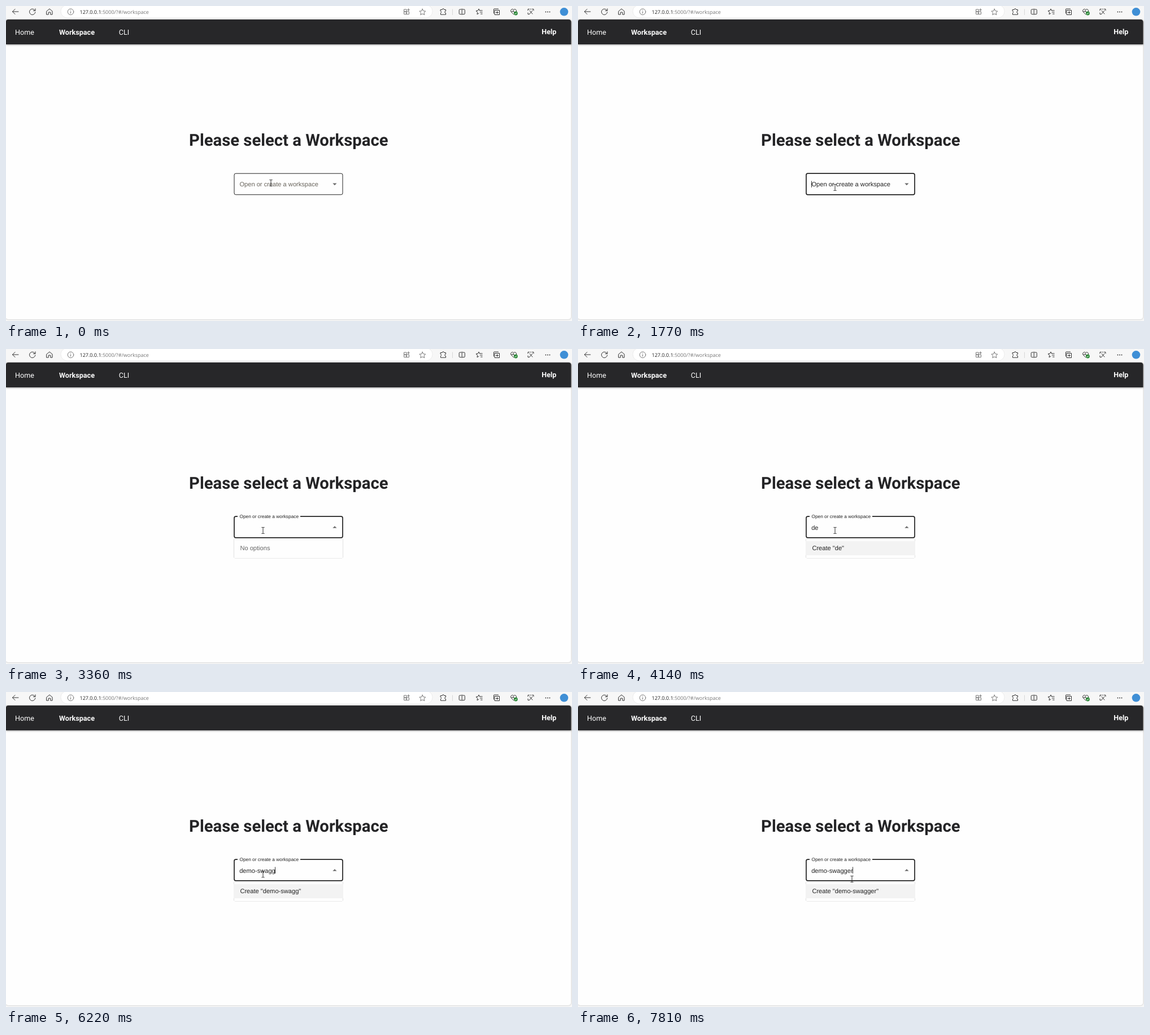
Animation, 1002 px wide and 559 px high, one loop 8 s. Source, as an HTML page:

```html
<!DOCTYPE html>
<html lang="en">
<head>
<meta charset="utf-8">
<title>Workspace picker</title>
<style>
  html, body { margin: 0; width: 100%; height: 100%; overflow: hidden; background: #f7f7f7; }
  svg { display: block; width: 100%; height: 100%; text-rendering: geometricPrecision; }
  .url { font: 9px "Open Sans", "Noto Sans", sans-serif; fill: #777; }
  .nav { font: 12.6px Roboto, sans-serif; fill: #fff; }
  .bold { font-weight: 700; }
  .title { font: 700 29.25px Roboto, sans-serif; fill: #242426; text-anchor: middle; }
  .field { font: 11.12px "Liberation Sans", Arial, sans-serif; fill: #222; }
  .icon { fill: none; stroke: #333; stroke-width: 1; stroke-linecap: round; stroke-linejoin: round; }
  .pale { stroke: #777; }
  .bar { fill: #272729; filter: drop-shadow(0 1.5px 1.5px rgba(0,0,0,.4)); }
  .paper { fill: #fefefe; filter: drop-shadow(0 .6px .6px rgba(0,0,0,.45)); }
  .page { fill: #fefefe; filter: drop-shadow(0 .5px 1px rgba(0,0,0,.3)); }
</style>
</head>
<body>
<svg viewBox="0 0 1002 559">
  <defs><path id="star" d="M0-5.5 1.7-1.9 5.5-1.5 2.7 1.2 3.5 5 0 3.1-3.5 5-2.7 1.2-5.5-1.5-1.7-1.9z"/></defs>
  <rect width="1002" height="559" fill="#f7f7f7"/>

  <!-- browser toolbar -->
  <rect x="97" y="-2" width="658" height="23" rx="11.5" fill="#fff" stroke="#e4e4e4" stroke-width=".7"/>
  <g class="icon">
    <path d="M22 10H11.5m4.5-4.5L11.5 10l4.5 4.5"/>
    <path d="M51.5 8.3a5.2 5.2 0 1 0 .4 2.6M52 4.8v3.6h-3.6"/>
    <path d="M72 9.2 77 5l5 4.2v5.9h-3.2v-4h-3.6v4H72z"/>
    <g class="pale">
      <circle cx="114.5" cy="10.3" r="5.3"/><path d="M114.5 9.8v3.2M114.5 7.6v.1"/>
      <path d="M705 6h4v4h-4zM705 10h4v4.5h-4zM709 10h4.5v4.5H709zM712.5 4.8v4M710.5 6.8h4"/>
      <use href="#star" x="737.3" y="10.7"/>
    </g>
    <path d="M769.5 6.5h2.8a1.7 1.7 0 0 1 3.4 0h2.8v2.6a1.7 1.7 0 0 0 0 3.4v2.7h-9v-2.9a1.7 1.7 0 0 0 0-3.2z"/>
    <path d="M806 6h-2.5q-1.3 0-1.3 1.3v6q0 1.3 1.3 1.3h2.5M808.500 6h2.5q1.3 0 1.3 1.3v6q0 1.3-1.3 1.3h-2.5M807.200 5v10.500"/>
    <path d="M838.500 8h4.700M839.500 11h3.700M840.500 14h2.700M837 13l-3 1.700.7-3.600-2.700-2.400 3.500-.5L837 5l1.500 3"/>
    <path d="M865.500 7.500h8v8h-8zM863.500 13V6q0-1 1-1h7M869.500 9.500v4M867.500 11.500h4"/>
    <path d="M899 15.200 894.300 10.600a2.900 2.900 0 0 1 4.400-4 2.900 2.900 0 0 1 4.800 3M894.500 10h2.500l1.200-2 1.500 4"/>
    <path d="M924 8V5.500h2.500M931.500 5.500h2.500V8M924 12v2.500h2.500M928.500 5.500h1M927 8l5 6M932 8l-5 6"/>
  </g>
  <circle cx="902.500" cy="13" r="3.400" fill="#2c8a39"/>
  <path d="M901 13l1.200 1.200 2-2.300" fill="none" stroke="#fff" stroke-width=".9"/>
  <path d="M790.500 5.500v10.500" stroke="#d8d8d8"/>
  <g fill="#333"><circle cx="955.500" cy="10.500" r=".9"/><circle cx="959" cy="10.500" r=".9"/><circle cx="962.500" cy="10.500" r=".9"/></g>
  <circle cx="988" cy="10.300" r="7.300" fill="#3f8fd6"/>
  <text class="url" x="130.500" y="13.700"><tspan fill="#222">127.0.0.1</tspan>:5000/?#/workspace</text>

  <!-- page -->
  <rect class="page" x="-1" y="24" width="1001.500" height="532" rx="5"/>
  <path class="bar" d="M0 68V28q0-4 4-4h992q4.500 0 4.500 4.500V68z"/>
  <g class="nav">
    <text x="16" y="50.500">Home</text>
    <text class="bold" x="94" y="50.500">Workspace</text>
    <text x="199.700" y="50.500">CLI</text>
    <text class="bold" x="948.300" y="50">Help</text>
  </g>
  <text class="title" x="500.300" y="248">Please select a Workspace</text>

  <!-- combo box -->
  <g id="popup">
    <rect class="paper" x="403.500" y="336" width="193" height="35.300" rx="2"/>
    <rect id="highlight" x="403" y="341" width="194" height="25" fill="#f3f3f3"/>
    <text id="option" class="field" x="414.400" y="357"></text>
  </g>
  <path id="outline" fill="none" stroke="#222"/>
  <text id="label" class="field">Open or create a workspace</text>
  <text id="input" class="field" x="413.200" y="320.500"></text>
  <rect id="caret" y="310.500" width="1" height="11.500" fill="#333"/>
  <path id="arrow" fill="#6b6b6b"/>
  <path id="pointer" d="M-2.500-5.500h2l.5.500.5-.500h2M0-5v10M-2.500 5.500h2l.5-.500.5.500h2" fill="none" stroke="#222" stroke-width=".95"/>
</svg>
<script>
const LOOP = 8000, FOCUS = 1700, LABEL_START = 1770, OPEN = 1830;
const el = id => document.getElementById(id);
const show = (id, on) => el(id).setAttribute('visibility', on ? 'visible' : 'hidden');
const set = (id, attrs) => { for (const k in attrs) el(id).setAttribute(k, attrs[k]); };

// [time, typed text]
const typing = [[0, ''], [3480, 'd'], [3610, 'de'], [4480, 'dem'], [4670, 'demo'], [4950, 'demo-'],
  [5140, 'demo-s'], [5820, 'demo-sw'], [6010, 'demo-swa'], [6130, 'demo-swag'], [6220, 'demo-swagg'],
  [6410, 'demo-swagge'], [6510, 'demo-swagger'], [6600, 'demo-swaggerr'], [7070, 'demo-swagger']];
// [time, x, y]
const pointer = [[0, 469, 314], [60, 461, 318], [590, 459, 319], [665, 457, 320], [740, 455, 321],
  [1050, 455, 322], [5820, 455, 323.5], [7690, 463, 325], [7750, 475, 329], [7810, 485, 332]];
const caretOff = [[0, 1770], [2300, 2830], [3360, 3480], [4140, 4480], [5700, 5820], [7160, 7690]];
const labelSteps = [[0], [1770], [1830], [1900], [1960], [2020]];

const latest = (steps, t) => steps.filter(s => s[0] <= t).pop();

// cubic-bezier(0, 0, .2, 1)
function easeOut(u) {
  let lo = 0, hi = 1;
  for (let i = 0; i < 20; i++) {
    const s = (lo + hi) / 2;
    if (.6 * (1 - s) * s * s + s ** 3 < u) lo = s; else hi = s;
  }
  return 3 * (1 - lo) * lo * lo + lo ** 3;
}

function draw(t) {
  const focused = t >= FOCUS, open = t >= OPEN;
  const [stepTime] = latest(labelSteps, t);
  const progress = easeOut(Math.min(1, Math.max(0, (stepTime - LABEL_START) / 200)));
  const [, text] = latest(typing, t);
  const [, x, y] = latest(pointer, t);

  set('label', {
    transform: `translate(413.4 ${319.6 - 19.9 * progress}) scale(${1 - .25 * progress})`,
    style: `fill:${focused ? '#222' : '#68645c'}`
  });
  const notch = stepTime > LABEL_START ? 'M521 297.200H593.200' : 'M406.800 297.200H593.200';
  const end = stepTime > LABEL_START ? 'H410' : 'z';
  set('outline', {
    d: `${notch}q2.800 0 2.800 2.800V332q0 2.800-2.800 2.800H406.800q-2.800 0-2.800-2.800V300q0-2.800 2.800-2.800${end}`,
    'stroke-width': focused ? 1.7 : 1
  });
  set('arrow', { d: open ? 'M578.300 317.800h7.200l-3.600-3.600z' : 'M578.300 314.600h7.200l-3.600 3.600z' });

  el('input').textContent = text;
  el('option').textContent = text ? `Create "${text}"` : 'No options';
  el('option').style.fill = text ? '#222' : '#666';
  el('popup').style.display = open ? '' : 'none';
  show('highlight', text);

  set('caret', { x: Math.floor(413.2 + (text ? el('input').getComputedTextLength() : 0)) });
  show('caret', !caretOff.some(([from, to]) => t >= from && t < to));
  set('pointer', { transform: `translate(${x} ${y})` });
}

const start = performance.now();
function tick() {
  draw((performance.now() - start) % LOOP);
  requestAnimationFrame(tick);
}
tick();
</script>
</body>
</html>
```
